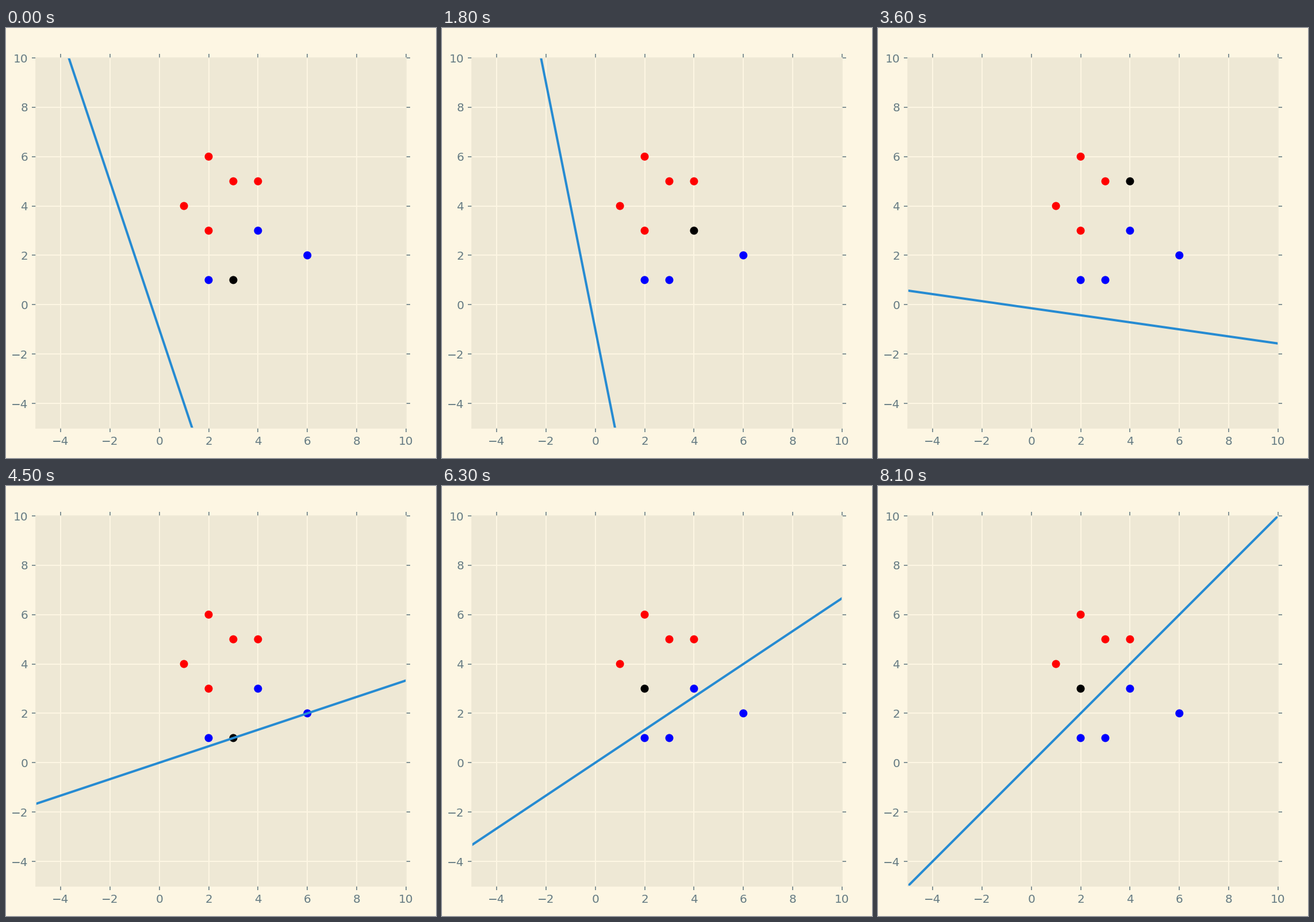
Write a matplotlib script that moves like this. It is 748 by 748 pixels and loops after 9 s.

```python
"""Perceptron learning: the decision line after each single-point update."""
import numpy as np
import matplotlib.pyplot as plt
from matplotlib.animation import FuncAnimation

SIZE, DPI = 748, 144
LEFT, RIGHT = 52, 696          # plot area in pixels, same on both axes
LOW, HIGH = -5, 10
PAPER, PANEL, INK, BLUE = "#FDF6E3", "#EEE8D5", "#657B83", "#268BD2"

POSITIVE = [(2, 1), (3, 1), (4, 3), (6, 2)]
NEGATIVE = [(1, 4), (2, 3), (2, 6), (3, 5), (4, 5)]
POINTS = np.array(POSITIVE + NEGATIVE)
LABELS = np.array([1] * len(POSITIVE) + [-1] * len(NEGATIVE))
COLORS = ["blue"] * len(POSITIVE) + ["red"] * len(NEGATIVE)

# Point used for each update
PICKS = [(3, 1), (2, 3), (4, 3), (2, 3), (4, 5),
         (3, 1), (4, 3), (2, 3), (4, 3), (2, 3)]


def train():
    """Return (point index, weights) after every update."""
    weights = np.zeros(3)
    steps = []
    for pick in PICKS:
        i = int(np.flatnonzero((POINTS == pick).all(axis=1))[0])
        weights = weights + LABELS[i] * np.append(POINTS[i], 1)
        steps.append((i, weights))
    return steps


STEPS = train()

plt.rcParams.update({
    "font.family": "DejaVu Sans", "font.size": 10,
    "axes.facecolor": PANEL, "axes.edgecolor": PANEL,
    "axes.linewidth": 0.8, "axes.axisbelow": True,
    "xtick.color": INK, "ytick.color": INK,
})

side = (SIZE + 0.001) / DPI    # guards against rounding down a pixel
fig = plt.figure(figsize=(side, side), dpi=DPI, facecolor=PAPER)
span = (RIGHT - LEFT) / SIZE
ax = fig.add_axes([LEFT / SIZE, 1 - RIGHT / SIZE, span, span])
ax.set(xlim=(LOW, HIGH), ylim=(LOW, HIGH),
       xticks=range(-4, 11, 2), yticks=range(-4, 11, 2))
ax.grid(color=PAPER, linewidth=1)
ax.tick_params(top=True, right=True, length=3.5, width=0.8, pad=3.5)

dots = ax.scatter(*POINTS.T, s=36, c=COLORS, linewidths=1)
line, = ax.plot([], [], color=BLUE, linewidth=2)
xs = np.array([LOW, HIGH])


def update(frame):
    picked, (a, b, c) = STEPS[frame]
    line.set_data(xs, -(a * xs + c) / b)
    shades = ["black" if i == picked else color
              for i, color in enumerate(COLORS)]
    dots.set_facecolor(shades)
    dots.set_edgecolor(shades)
    return line, dots


anim = FuncAnimation(fig, update, frames=len(STEPS), interval=900,
                     repeat=True, repeat_delay=0)
plt.show()
```
